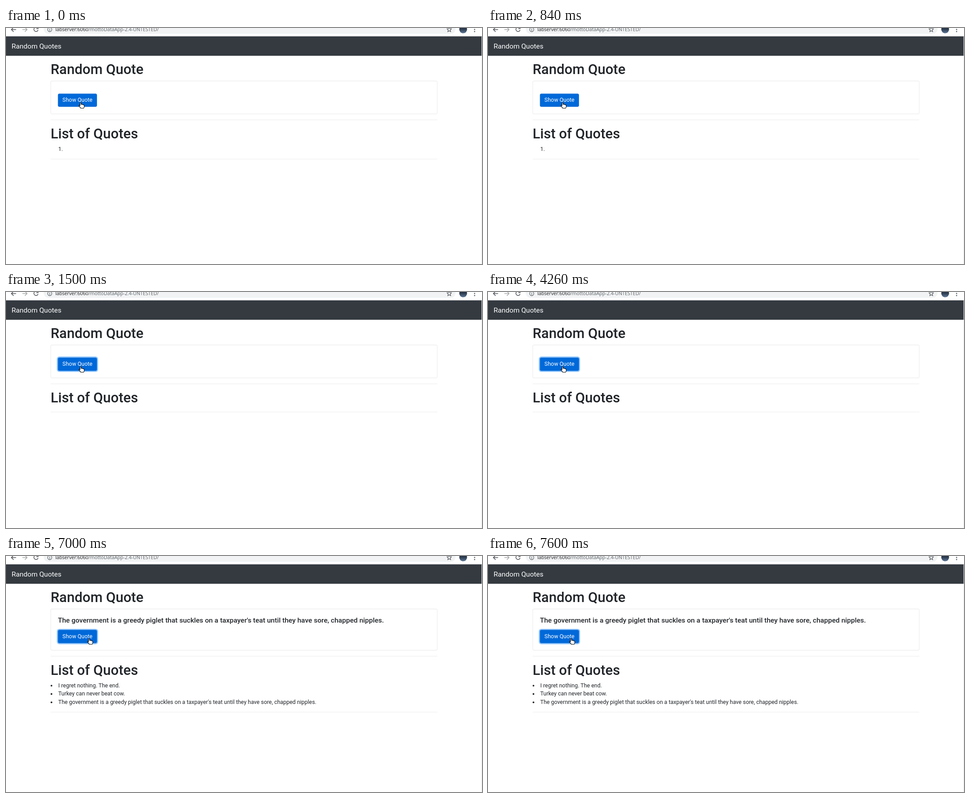
These frames come from a looping animation (1061 by 528 pixels, 8000 ms). An HTML page:

```html
<!DOCTYPE html>
<html lang="en">
<head>
<meta charset="utf-8">
<title>Random Quotes</title>
<style>
  html, body { margin: 0; width: 100%; height: 100%; overflow: hidden; background: #fff; }
  svg { position: absolute; left: 0; top: 0; }
  .url { font: 10.7px "Open Sans", "Noto Sans", sans-serif; fill: #5f6368; }
  .icon { fill: none; stroke: #4b4f54; stroke-width: 1.5; }

  /* The page is laid out 1366px wide and shown smaller. */
  #page { position: absolute; left: 0; top: 0; width: 1366px; height: 680px; overflow: hidden;
    transform: scale(calc(1061 / 1366)); transform-origin: 0 0;
    font: 16px/1.5 Roboto, sans-serif; color: #212529; }
  nav { margin-top: 24px; height: 56px; padding-left: 16px; background: #343a40; color: #fff; font-size: 20px; line-height: 56px; }
  main { width: 1110px; margin: 16px auto 0; }
  h1, h5 { font-weight: 500; line-height: 1.2; white-space: nowrap; }
  h1 { margin: 0 0 8px; font-size: 40px; }
  h5 { margin: 0 0 16px; font-size: 20px; }
  .card { padding: 20px; border: 1px solid rgba(0, 0, 0, .125); border-radius: 4px; }
  .button { width: fit-content; padding: 6px 12px; border: 1px solid #0062cc; border-radius: 4px; color: #fff; white-space: nowrap; }
  .button.focus { box-shadow: 0 0 0 3.2px rgba(38, 143, 255, .5); }
  hr { height: 1px; margin: 16px 0; border: 0; background: rgba(0, 0, 0, .1); }
  ul { margin: 0; padding: 0; list-style: none; }
  li { position: relative; padding-left: 22px; }
  li.dot::before { content: ""; position: absolute; left: 0; top: 10px; width: 5px; height: 5px; border-radius: 50%; background: #212529; }
</style>
</head>
<body>
<div id="page">
  <nav>Random Quotes</nav>
  <main>
    <h1>Random Quote</h1>
    <div class="card">
      <h5 id="quote"></h5>
      <div id="button" class="button">Show Quote</div>
    </div>
    <hr>
    <h1>List of Quotes</h1>
    <ul id="list"></ul>
    <hr>
  </main>
</div>

<svg width="1061" height="528" viewBox="0 0 1061 528">
  <defs>
    <linearGradient id="portrait" x2="0" y2="1">
      <stop offset=".3" stop-color="#1d2939"/>
      <stop offset="1" stop-color="#5c7796"/>
    </linearGradient>
  </defs>
  <rect x="84" y="-9" width="918" height="22" rx="11" fill="#f1f3f4"/>
  <path class="icon" d="M22.5 3.5H12.5M17 -1.5L12 3.5L17 8.5"/>
  <path class="icon" d="M36.5 3.5H46.5M42 -1.5L47 3.5L42 8.5" stroke-opacity=".5"/>
  <path class="icon" d="M70.5 -.3A4.8 4.8 0 1 0 71.6 4.6M71.6 -2V1.5H67.5"/>
  <circle class="icon" cx="97.5" cy="3.5" r="4.6" style="stroke-width:1.1"/>
  <path class="icon" d="M97.5 3V6M97.5 .8V2" style="stroke-width:1.2"/>
  <text class="url" x="110" y="7"><tspan fill="#202124">labserver:6060</tspan>/mottoDataApp-2.4-UNTESTED/</text>
  <path class="icon" style="stroke-width:1.1" d="M988 -2L989.5 1.6L993 2L990.3 4.5L991.2 8.2L988 6.2L984.8 8.2L985.7 4.5L983 2L986.5 1.6Z"/>
  <circle cx="1019" cy="3" r="8.7" fill="url(#portrait)"/>
  <g fill="#4b4f54">
    <circle cx="1044.5" cy="-1" r="1.3"/>
    <circle cx="1044.5" cy="3.5" r="1.3"/>
    <circle cx="1044.5" cy="8" r="1.3"/>
  </g>
  <path d="M1060.5 18.6V528" stroke="#e8e8e8"/>
  <path id="hand" fill="#fff" stroke="#000" stroke-width="1.1" stroke-linejoin="round"
    d="M165 174V167.5Q166.2 165.7 167.4 167.5V171Q168.8 169.9 169.8 171.3Q171.2 170.6 172 171.9Q174 171.4 174.3 173.4V176Q174.2 178 173 179.5H166.5Q165.5 177.2 162.7 174.5Q162.3 172.8 163.8 172.9Z"/>
</svg>
<script>
const LOOP = 8000;
const QUOTE = "The government is a greedy piglet that suckles on a taxpayer's teat until they have sore, chapped nipples.";
const QUOTES = ["I regret nothing. The end.", "Turkey can never beat cow.", QUOTE];
const STATES = [
  { from: 0, face: "#0069d9", list: ["1."] },
  { from: 1400, face: "#0065d2", list: ["1."] },
  { from: 1500, face: "#0069d9", focus: true, list: [] },
  { from: 6100, face: "#0069d9", focus: true, loaded: true, list: QUOTES.slice(0, 2) },
  { from: 7000, face: "#0069d9", focus: true, loaded: true, list: QUOTES },
];

const $ = id => document.getElementById(id);
let shown;

function render(time) {
  const state = STATES.findLast(s => time >= s.from);
  if (state === shown) return;
  shown = state;
  $("quote").textContent = state.loaded ? QUOTE : "";
  $("button").style.background = state.face;
  $("button").classList.toggle("focus", !!state.focus);
  $("list").replaceChildren(...state.list.map(text => {
    const item = document.createElement("li");
    item.textContent = text;
    item.classList.toggle("dot", !!state.loaded);
    return item;
  }));
  $("hand").setAttribute("transform", state.loaded ? "translate(19 18)" : "");
}

const start = performance.now();
function tick() {
  render((performance.now() - start) % LOOP);
  requestAnimationFrame(tick);
}
tick();
</script>
</body>
</html>
```
